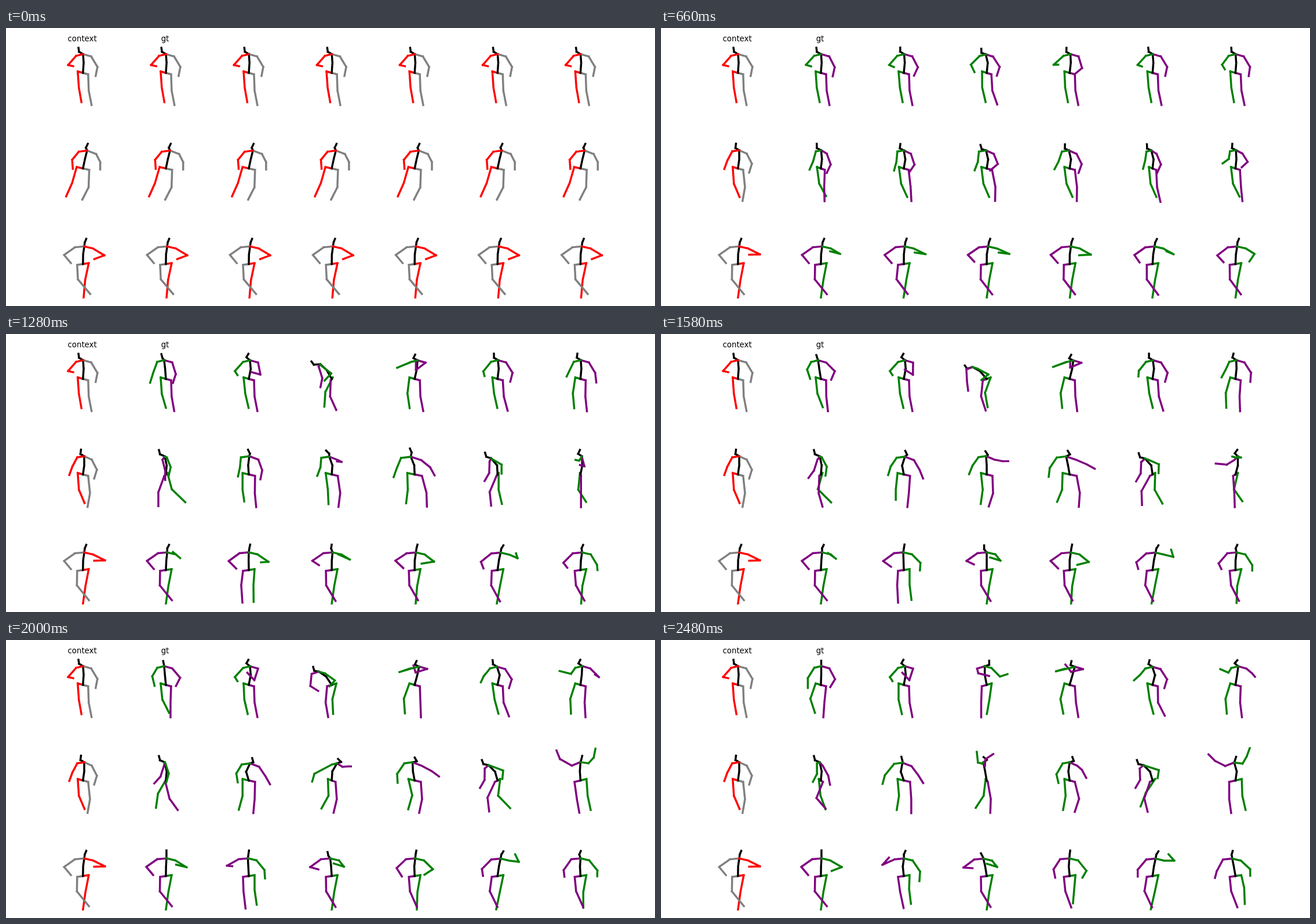
Animation, 1120 px wide and 480 px high, one loop 2.5 s. Source, as an HTML page:

```html
<!DOCTYPE html>
<html lang="en">
<head>
<meta charset="utf-8">
<style>
html, body { margin: 0; width: 100%; height: 100%; overflow: hidden; background: #fff; }
svg { display: block; }
text { font: 13.3px "DejaVu Sans", sans-serif; text-anchor: middle; }
path { fill: none; stroke-width: 3.47; stroke-linecap: square; }
</style>
</head>
<body>
<svg id="stage" width="1120" height="480" viewBox="0 0 1120 480">
<text x="131.6" y="23">context</text>
<text x="274.5" y="23">gt</text>
</svg>
<script>
const LOOP = 2500, STEP = 20, CONTEXT_END = 480;
const COLS = 7, COL_GAP = 143.1, ROW_GAP = 165;
const NS = "http://www.w3.org/2000/svg";
const stage = document.getElementById("stage");

// Each row has one body: joint offsets, bone lengths and the shared context motion.
// Limb keys are { time: [angle per bone, ...optional stretches] }. Angles are in degrees,
// from straight down for arms and legs and from straight up for the torso.
const bodies = [
  {
    hip: [-9, -2.5], collarA: [-12, 3], collarB: [14, 4],
    bones: { torso: [17.5, 15, 8, 7], armA: [21, 17], armB: [21, 16], legA: [28, 25.5], legB: [28, 25.5] },
    context: {
      turn: { 480: [1] }, torso: { 480: [4, -4, -60, -8] },
      armA: { 480: [-41, 77, .53] }, armB: { 480: [31, -11] },
      legA: { 480: [4, 10] }, legB: { 480: [2, 11] }
    }
  },
  {
    hip: [-9, -2.5], collarA: [-12, 2], collarB: [13, 6],
    bones: { torso: [15.7, 16, 7.5, 7.5], armA: [18, 15.5], armB: [19.5, 16], legA: [29, 25], legB: [30, 24] },
    context: {
      turn: { 0: [1.2], 480: [1] }, torso: { 0: [12, 14, -22, 25, .7], 480: [8, 0, -60, 7] },
      armA: { 0: [-39, 4], 480: [-28, -20] }, armB: { 0: [27, 0, .8, .8], 480: [27, -17] },
      legA: { 0: [-16, -24], 480: [4, 23] }, legB: { 0: [-2, -27], 480: [6, -10] }
    }
  },
  {
    hip: [10, -1.5], collarA: [15, 3.5], collarB: [-16, 1.5],
    bones: { torso: [16.5, 14, 7, 6.7], armA: [23, 18.5], armB: [23, 18.4], legA: [29.8, 30.5], legB: [25, 33] },
    context: {
      turn: { 480: [1] }, torso: { 480: [1, 8, 8, 22] },
      armA: { 0: [59, -69], 480: [64, -88] }, armB: { 480: [-55, 40] },
      legA: { 0: [-12, -5], 480: [-11, -8] }, legB: { 0: [3, 40], 480: [-1, 39] }
    }
  }
];

function make(name, attrs, parent) {
  const node = document.createElementNS(NS, name);
  for (const key in attrs) node.setAttribute(key, attrs[key]);
  return parent.appendChild(node);
}

const rowGroups = bodies.map((_, r) => {
  const clip = make("clipPath", { id: "row" + r }, stage);
  make("rect", { x: 0, y: 20 + r * ROW_GAP, width: 1120, height: 117 }, clip);
  return make("g", { "clip-path": `url(#row${r})` }, stage);
});

const figures = [];

// Adds a figure that leaves the shared context through its own moves
function act(row, col, moves = {}) {
  const body = bodies[row], tracks = {};
  for (const part in body.context) {
    const size = 2 * (body.bones[part]?.length ?? 1);
    const keys = Object.entries({ ...body.context[part], ...moves[part] });
    tracks[part] = keys.map(([time, values]) =>
      ({ time: +time, values: Array.from({ length: size }, (_, i) => values[i] ?? 1) }));
  }
  figures.push({
    body, tracks, isContext: col === 0,
    root: [132.8 + col * COL_GAP, 77.5 + row * ROW_GAP],
    limbs: Array.from({ length: 5 }, () => make("path", {}, rowGroups[row]))
  });
}

bodies.forEach((_, row) => act(row, 0));

act(0, 1, {
  torso: { 920: [4, -4, -60, -8], 1580: [-9, -8, -20, -18, .3], 2480: [2, 0, 0, 0, .3] },
  armA: { 920: [-41, 60, .6], 1280: [-20, -17], 1580: [-28, 18, 1, .7], 2480: [-32, 0] },
  armB: { 1280: [17, -18], 1580: [45, -23], 2480: [28, -31] },
  legA: { 1280: [4, 16], 2000: [6, 27], 2480: [-19, 18] },
  legB: { 1280: [2, 10], 2000: [-2, 0], 2480: [-6, -4] }
});
act(0, 2, {
  torso: { 1280: [11, -5, -50, 30] },
  armA: { 1280: [-42, 32, .5] },
  armB: { 920: [22, -48], 1280: [11, -105], 2000: [-18, -137, 1.1] },
  legA: { 1280: [6, 13], 2480: [0, 13] }
});
act(0, 3, {
  turn: { 920: [.67], 1280: [-.2], 1580: [-.75], 2480: [-.95] },
  torso: { 920: [4, -27, -84, 0], 1280: [-30, -47, -95, -36, 1.4], 1580: [-41, -61, -108, -36, 1.2], 2000: [-34, -56, -80, -16], 2480: [-11, 0, 72, 0] },
  armA: { 920: [-39, -37, 1.2], 1280: [52, -43], 2000: [54, -42, .8], 2480: [45, 108, .8] },
  armB: { 920: [33, -23], 1580: [3, 7], 2000: [-6, 58], 2480: [14, 76, 1.2, .4] },
  legA: { 920: [-6, 15], 1280: [-27, -4], 1580: [-20, 10], 2480: [-8, -10] },
  legB: { 920: [4, 28], 1580: [-6, 18], 2480: [-2, 0] }
});
act(0, 4, {
  torso: { 920: [10, 0, -62, 14], 1580: [14, 8, -63, 30], 2480: [16, 16, -68, 14] },
  armA: { 920: [-57, 110, .5, 1.2], 1280: [-67, 112, 1.4, 1.2], 2480: [-77, 106, .9] },
  armB: { 920: [-6, -107], 1280: [-53, -180], 1580: [-67, -180, .7], 2480: [-77, -142] },
  legA: { 920: [0, 11], 2000: [-20, 4], 2480: [-14, 11] },
  legB: { 1280: [2, 11], 2000: [2, 2], 2480: [4, 9] }
});
act(0, 5, {
  torso: { 1580: [8, -7, -58, 0], 2000: [12, -18, -58, -6], 2480: [14, -18, -55, 14] },
  armA: { 920: [-43, 56, .4], 1280: [-39, 14, .5], 2480: [-40, -48, .8, .7] },
  armB: { 2000: [33, -17] },
  legA: { 2000: [8, 15] },
  legB: { 1580: [4, 17], 2480: [1, 27] }
});
act(0, 6, {
  torso: { 1280: [5, -4, -58, 8], 2480: [9, 8, -50, 40] },
  armA: { 920: [-31, -22, .6, .8], 1580: [-25, -28, .9, .7], 2000: [-35, -104, 1.2, .6], 2480: [-32, -113, .9, .45] },
  armB: { 1580: [33, -4], 2000: [45, -122, .5], 2480: [50, 40, .5, .6] },
  legA: { 920: [2, 10], 1580: [-16, 2], 2480: [-17, 5] },
  legB: { 920: [3, 12], 1580: [-4, 2], 2480: [-2, 7] }
});

act(1, 1, {
  turn: { 920: [.3], 1280: [-.3], 2000: [-.1], 2480: [.4] },
  torso: { 920: [5, -12, -66, -14, 1.2] },
  armA: { 920: [4, -22], 1580: [28, -8], 2480: [0, -27] },
  armB: { 920: [9, -30], 1280: [14, 0], 1580: [-18, -36], 2000: [-18, -42], 2480: [29, 11] },
  legA: { 920: [11, 31], 1280: [15, 46, 1.3], 1580: [-16, 45, 1.3], 2000: [-30, -8], 2480: [6, 20] },
  legB: { 920: [-17, 15], 1280: [-20, 0], 1580: [-2, 16], 2000: [14, 36], 2480: [-22, 41] }
});
act(1, 2, {
  turn: { 920: [.9], 1280: [1.2] },
  torso: { 920: [11, -18, -53, 7], 1280: [-4, 7, 14, -26, .6], 2000: [-17, 25, 72, -16, .8], 2480: [-19, 10, 0, -14, .4] },
  armA: { 920: [22, -4], 1580: [-34, -17], 2000: [-31, 9], 2480: [-39, -15, 1, 1.4] },
  armB: { 920: [6, -53], 1280: [20, -11], 1580: [30, 22], 2480: [37, 32] },
  legA: { 920: [8, 17], 1580: [-6, 0, .7], 2000: [0, -15], 2480: [5, -9] },
  legB: { 920: [5, 18], 1580: [-4, -6], 2480: [4, 0] }
});
act(1, 3, {
  turn: { 920: [1.1], 1580: [1.1], 2480: [.2] },
  torso: { 920: [10, -28, -72, -50], 1580: [0, -4, 56, -34, .5], 2000: [4, 30, 72, -45], 2480: [-10, -11, 54, -50] },
  armA: { 920: [20, -18], 1580: [-35, -22], 2000: [-62, -16, .9, 1.9], 2480: [-104, -174, 1.2, .4] },
  armB: { 920: [20, -100, 1.1, .8], 1280: [63, -97, .5, .35], 1580: [79, 90, .6, .75], 2000: [94, 90, .3, .5], 2480: [175, 123, 1, .6] },
  legA: { 920: [8, 13], 1580: [6, -8], 2000: [2, -29], 2480: [-7, -33] },
  legB: { 920: [16, 7], 1580: [2, -18], 2480: [10, -2] }
});
act(1, 4, {
  turn: { 920: [1.1], 1280: [1.4], 2480: [1] },
  torso: { 920: [8, -28, -59, -7], 1580: [-10, -12, 63, -32], 2480: [-8, 8, 74, -20] },
  armA: { 920: [-9, -32], 1580: [-34, -7, 1, 1.2], 2480: [-30, 13, 1, 1.2] },
  armB: { 920: [30, -13], 1580: [67, 61], 2000: [62, 54], 2480: [49, 28, 1, .55] },
  legA: { 920: [8, 14], 1580: [-2, -22, .9], 2000: [13, -16], 2480: [4, -10] },
  legB: { 920: [8, 10], 1280: [15, 2], 2000: [4, -12], 2480: [14, -18] }
});
act(1, 5, {
  turn: { 920: [.2], 1580: [-.5] },
  torso: { 920: [3, -33, -70, -14, 1.1], 2000: [-16, -45, -78, -20, 1.2] },
  armA: { 920: [27, 0, 1, .6], 1280: [60, 0], 2480: [72, -9, .9, 1.2] },
  armB: { 920: [13, -33], 1280: [-2, -30], 2480: [2, -30] },
  legA: { 920: [4, 16], 1280: [0, 13], 2000: [-7, 44, 1.2], 2480: [-34, -21] },
  legB: { 920: [-6, 42, 1.2], 1280: [-23, 6], 1580: [-29, 2], 2480: [-19, 14] }
});
act(1, 6, {
  turn: { 920: [.6], 1280: [.1], 1580: [-.45], 2000: [-1.15], 2480: [-1.2] },
  torso: { 920: [4, -4, -60, 7], 1580: [15, 0, -45, 36], 2000: [-4, 4, 18, 14, .5], 2480: [8, -16, 20, 18, .4] },
  armA: { 920: [9, -102, .6, .35], 1580: [-90, -105, .4, .5], 2000: [-222, -191, 1, .75], 2480: [-210, -200, 1, .8] },
  armB: { 920: [38, -96, .6, .6], 1280: [15, -106, .5, .6], 1580: [-58, -96, 1.2, .8], 2000: [-119, -158, 1, 1.2], 2480: [-117, -135] },
  legA: { 920: [6, 25], 1580: [-13, 35], 2000: [4, 12], 2480: [2, 13] },
  legB: { 920: [-2, 25], 1280: [0, 0], 2000: [8, 10], 2480: [0, 8] }
});

act(2, 1, {
  torso: { 1580: [3, 5, 0, 25], 2000: [1, 3, 0, 0] },
  armA: { 920: [52, -126, .9, .5], 1580: [50, -126, .9, .5], 2000: [59, -104], 2480: [60, -69] }
});
act(2, 2, {
  torso: { 920: [0, 4, 8, 16], 2000: [-3, -3, 8, 8], 2480: [-6, 8, 0, 23] },
  armA: { 920: [63, -110], 1280: [56, -86, .7], 1580: [45, -4, .7, .9], 2480: [34, -4, .9] },
  armB: { 1280: [-54, 45], 1580: [-54, 54, .9], 2000: [-61, 84, .5], 2480: [-66, 138, .9] },
  legA: { 920: [-10, -8], 1580: [0, 7, .87, .9], 2480: [-2, 7, .85, .8] },
  legB: { 920: [-12, 30, .9], 1280: [-7, 4, .91], 2480: [8, 12, .9] }
});
act(2, 3, {
  torso: { 920: [0, 11, 8, 16], 1580: [0, 0, -39, 0], 2480: [-9, -13, -20, -27, .5] },
  armA: { 920: [68, -110], 1280: [59, -114, 1.2, .75], 1580: [39, -107, 1, .6] },
  armB: { 920: [-56, 48, .75], 2480: [-53, 86, .85] },
  legB: { 1280: [1, 31, .95] }
});
act(2, 4, {
  torso: { 1580: [0, 8, 8, 12], 2480: [-5, 4, 4, 8] },
  armA: { 920: [55, -82, 1.2, .9], 1580: [51, -76, 1.1, .9], 2480: [39, -30, .75] },
  armB: { 1580: [-55, 45], 2480: [-33, 11, .8, .9] },
  legA: { 2000: [-10, -2], 2480: [-5, -5, .82, .8] },
  legB: { 1280: [2, 30, .9], 2480: [6, 20, .9] }
});
act(2, 5, {
  torso: { 920: [8, 12, 11, 32] },
  armA: { 920: [57, -149, .3, .7], 1580: [76, -163, .7, .7], 2480: [90, -138, .8, .75] },
  armB: { 920: [-54, 28, .7], 2480: [-40, 0, .65] },
  legA: { 2480: [-12, -13] },
  legB: { 920: [2, 32], 1580: [-6, 27, .92], 2480: [-9, 25, .93] }
});
act(2, 6, {
  torso: { 920: [4, 9, 0, 23], 2000: [-3, 4, -18, 23], 2480: [-10, -11, -9, 16] },
  armA: { 920: [45, 52, .6, .45], 1280: [31, 6, .5, .9], 2480: [47, 0, .6, .95] },
  armB: { 920: [-49, 45, .7], 1280: [-45, 38, .6], 2480: [-28, -15, .65] },
  legA: { 1280: [-13, -4], 2000: [-10, 0, .88], 2480: [13, 2, .92, .75] },
  legB: { 920: [4, 32, .93], 2480: [6, 21, .9] }
});

// Cubic Hermite interpolation with finite-difference tangents
function sample(keys, t) {
  const last = keys.length - 1;
  if (t <= keys[0].time) return keys[0].values;
  if (t >= keys[last].time) return keys[last].values;
  const i = keys.findIndex(key => key.time > t) - 1;
  const a = keys[i], b = keys[i + 1];
  const before = keys[Math.max(i - 1, 0)], after = keys[Math.min(i + 2, last)];
  const span = b.time - a.time, u = (t - a.time) / span, u2 = u * u, u3 = u2 * u;
  return a.values.map((p, k) => {
    const q = b.values[k];
    const m = (q - before.values[k]) / (b.time - before.time) * span;
    const n = (after.values[k] - p) / (after.time - a.time) * span;
    return p + (q - p) * (3 * u2 - 2 * u3) + m * (u3 - 2 * u2 + u) + n * (u3 - u2);
  });
}

const shift = ([x, y], [dx, dy], turn) => [x + dx * turn, y + dy];

// Stretches begin at the middle bone (neck, forearm, shin) and wrap around
function chain(start, lengths, values, direction = 1) {
  const n = lengths.length, points = [start];
  lengths.forEach((length, i) => {
    const reach = length * values[n + (i + n / 2) % n], angle = values[i] * Math.PI / 180;
    const [x, y] = points[i];
    points.push([x + reach * Math.sin(angle), y + direction * reach * Math.cos(angle)]);
  });
  return points;
}

// Every bone is its own capped segment
function bones(points) {
  return points.slice(1).map((p, i) => `M${points[i]}L${p}`).join("");
}

function drawFigure({ body, tracks, isContext, root, limbs }, t) {
  const time = isContext ? Math.min(t, CONTEXT_END) : t;
  const [turn] = sample(tracks.turn, time);
  const limb = (part, start, direction) =>
    chain(start, body.bones[part], sample(tracks[part], time), direction);
  const torso = limb("torso", root, -1), chest = torso[2];
  const [sideA, sideB] = time <= CONTEXT_END ? ["red", "gray"] : ["green", "purple"];
  const parts = [
    [sideA, [root, ...limb("legA", shift(root, body.hip, turn))]],
    [sideB, [root, ...limb("legB", shift(root, body.hip.map(v => -v), turn))]],
    ["black", torso],
    [sideB, [chest, ...limb("armB", shift(chest, body.collarB, turn))]],
    [sideA, [chest, ...limb("armA", shift(chest, body.collarA, turn))]]
  ];
  parts.forEach(([color, points], i) => {
    limbs[i].setAttribute("stroke", color);
    limbs[i].setAttribute("d", bones(points));
  });
}

function render(now) {
  const t = Math.floor(now % LOOP / STEP) * STEP;
  figures.forEach(figure => drawFigure(figure, t));
}

let start;
function tick(now) {
  start ??= now;
  render(now - start);
  requestAnimationFrame(tick);
}
render(0);
requestAnimationFrame(tick);
</script>
</body>
</html>
```
